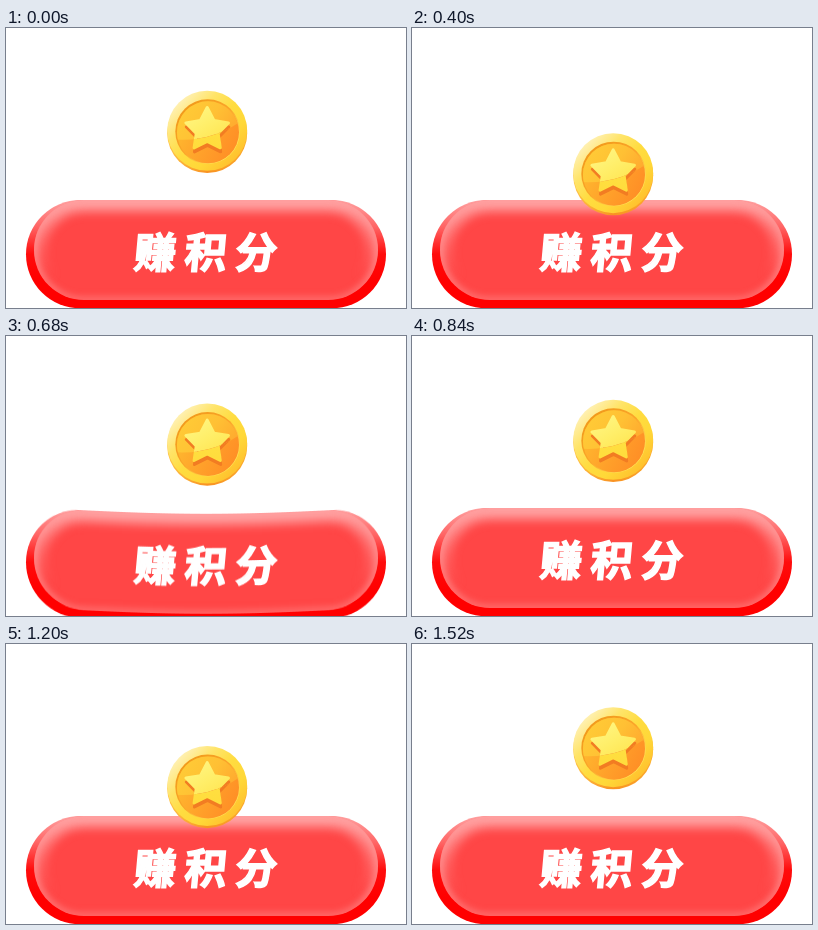
Animation, 400 px wide and 280 px high, one loop 1560 ms. Source, as an HTML page with a canvas:

```html
<!DOCTYPE html>
<html lang="zh">
<head>
<meta charset="utf-8">
<style>
  html, body { margin: 0; overflow: hidden; background: #fff; }
  canvas { display: block; }
</style>
</head>
<body>
<canvas id="stage" width="400" height="280"></canvas>
<script>
const ctx = document.getElementById('stage').getContext('2d');
const LOOP = 1560, STEP = 40, DROP = 43.5;

function gradient(c, x0, y0, x1, y1, ...colors) {
  const g = c.createLinearGradient(x0, y0, x1, y1);
  colors.forEach((color, i) => g.addColorStop(i / (colors.length - 1), color));
  return g;
}

function pill(x, y, w, h) {
  const p = new Path2D();
  p.roundRect(x, y, w, h, h / 2);
  return p;
}

function glow(c, path, width, blur, style) {
  c.filter = `blur(${blur}px)`;
  c.lineWidth = width;
  c.strokeStyle = style;
  c.stroke(path);
}

function makeButton() {
  const layer = document.createElement('canvas');
  layer.width = 400;
  layer.height = 300;
  const c = layer.getContext('2d');
  c.fillStyle = gradient(c, 0, 172, 0, 280, '#ffa0a0', '#ff6464', '#ff0c0c', '#ff0000', '#ff0000');
  c.fill(pill(20, 172, 360, 108.5));

  const face = pill(28, 172, 344, 100);
  c.save();
  c.clip(face);
  c.fillStyle = '#ff4646';
  c.fill(face);
  glow(c, face, 24, 5, gradient(c, 0, 172, 0, 250, 'rgba(255,160,160,1)', 'rgba(255,150,150,.5)', 'rgba(255,140,140,0)'));
  glow(c, face, 7, 3, gradient(c, 0, 172, 0, 272, '#ffa0a0', '#ff8c8c', '#ff6c6c'));
  c.restore();

  c.fillStyle = c.strokeStyle = '#fff';
  c.lineWidth = 1.6;
  c.lineJoin = 'miter';
  c.miterLimit = 3;
  c.font = '900 42px "Noto Sans CJK SC", "Noto Sans CJK", sans-serif';
  c.textAlign = 'center';
  c.transform(1, 0, -0.09, 1, 0, 224);
  [...'赚积分'].forEach((ch, i) => {
    c.fillText(ch, 149.5 + i * 50.5, 16);
    c.strokeText(ch, 149.5 + i * 50.5, 16);
  });
  return layer;
}

const star = new Path2D();
for (let i = 0; i < 10; i++) {
  const a = i * Math.PI / 5 - Math.PI / 2, r = i % 2 ? 11.5 : 22.3;
  star.lineTo(r * Math.cos(a), r * Math.sin(a));
}
star.closePath();

const sheen = new Path2D('M-40-40H40V-14Q4 14-40 8Z');

function disc(x, y, r, fill) {
  ctx.fillStyle = fill;
  ctx.beginPath();
  ctx.arc(x, y, r, 0, 2 * Math.PI);
  ctx.fill();
}

function drawStar(x, y, color) {
  ctx.save();
  ctx.translate(x, y);
  ctx.fillStyle = ctx.strokeStyle = color;
  ctx.lineWidth = 3;
  ctx.lineJoin = 'round';
  ctx.fill(star);
  ctx.stroke(star);
  ctx.restore();
}

function drawMedal(discFill, starFill) {
  disc(0.8, 1.5, 31, discFill);
  drawStar(0.4, 3, '#f27c22');
  drawStar(0, -1, starFill);
}

function drawCoin(y) {
  ctx.save();
  ctx.translate(201.2, 102.8 + y);
  disc(0, 2.2, 40, gradient(ctx, -40, 0, 40, 0, '#ffc246', '#f99222', '#fba92c'));
  disc(0, 0, 40, gradient(ctx, -28, -28, 28, 28, '#fff0b0', '#ffe468', '#ffdc40', '#ffd838', '#ffc22e'));
  disc(0.4, 0.8, 32.3, gradient(ctx, -22, -22, 22, 24, '#f29a1c', '#fba52a', '#ffe85c'));
  drawMedal(gradient(ctx, -24, 0, 24, 24, '#ffb42e', '#ffa02a', '#ff8f26'),
            gradient(ctx, 0, -5, 0, 20, '#ffe042', '#ffdc3c'));
  ctx.clip(sheen);
  drawMedal(gradient(ctx, -22, -22, 24, 8, '#ffca36', '#ffc034', '#ffa82e'),
            gradient(ctx, -8, -20, 10, 10, '#fff47c', '#ffee68', '#ffe654'));
  ctx.restore();
}

const fall = s => s ** 2.15;
const rise = s => 1 - s - s * s + s ** 3;

// Each leg: start, end, share of the drop over time
const legs = [[0, 405, fall], [405, 770, rise], [770, 1165, fall], [1165, 1545, rise]];

function coinOffset(t) {
  const leg = legs.find(([start, end]) => t >= start && t < end);
  return leg ? DROP * leg[2]((t - leg[0]) / (leg[1] - leg[0])) : 0;
}

function dentDepth(t) {
  return t > 400 && t < 800 ? 8.8 * Math.sin(Math.PI * (t - 400) / 400) ** 2 : 0;
}

const button = makeButton();

function drawButton(depth) {
  if (!depth) return ctx.drawImage(button, 0, 0);
  for (let x = 0; x < 400; x++) {
    const dy = depth * Math.max(0, 1 - ((x - 199.5) / 178) ** 2) ** 1.5;
    ctx.drawImage(button, x, 0, 1, 300, x, dy, 1, 300);
  }
}

function frame() {
  const t = Math.floor(performance.now() % LOOP / STEP) * STEP;
  ctx.fillStyle = '#fff';
  ctx.fillRect(0, 0, 400, 280);
  drawButton(dentDepth(t));
  drawCoin(coinOffset(t));
  requestAnimationFrame(frame);
}
frame();
</script>
</body>
</html>
```
